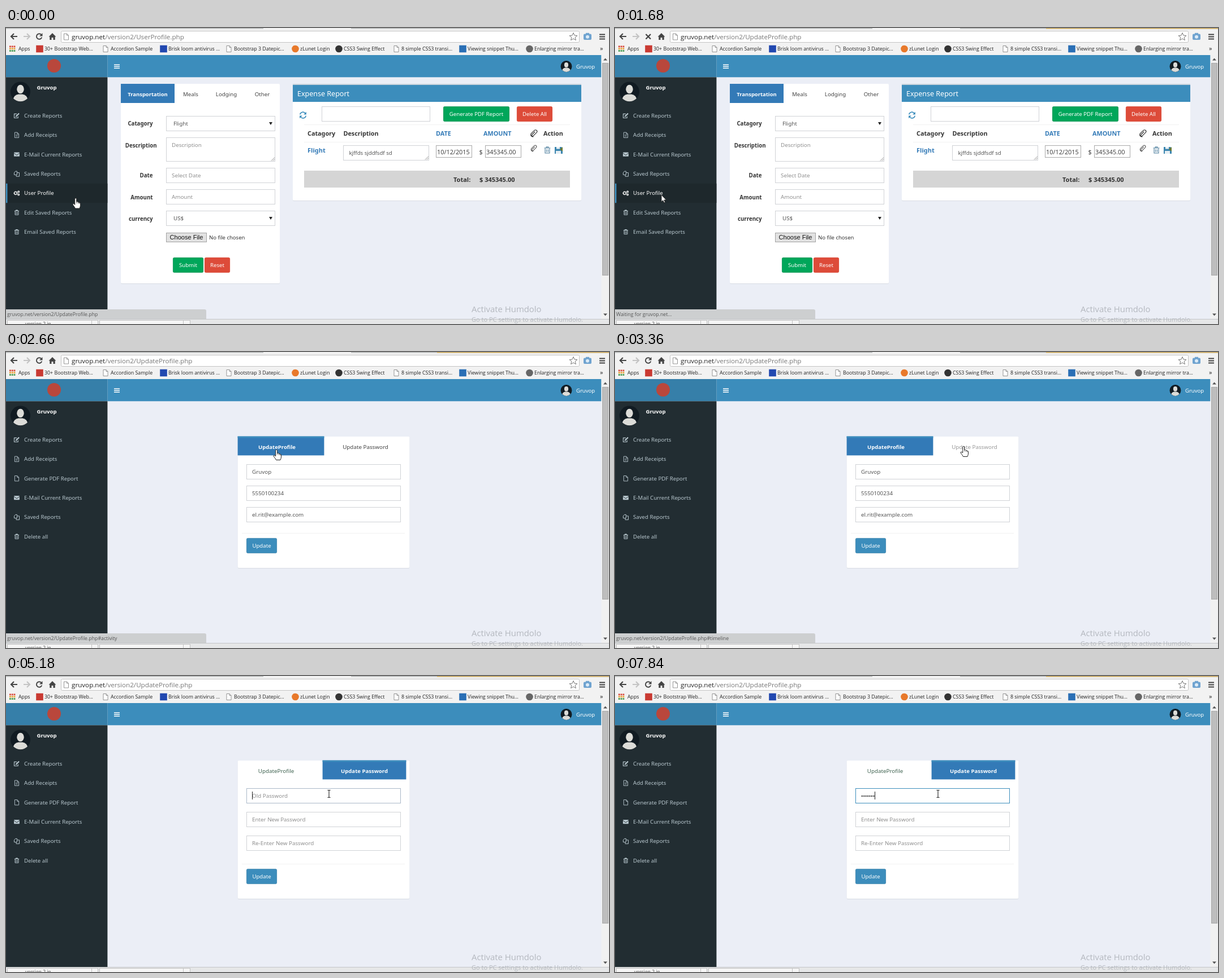
Animation of 1066x525 px, one loop 8 s. Source, as an HTML page:

```html
<!DOCTYPE html>
<html lang="en">
<head>
<meta charset="utf-8">
<title>Expense profile</title>
<style>
html, body { margin: 0; width: 100%; height: 100%; overflow: hidden; background: #ebeef6; }
svg { display: block; width: 100vw; height: 100vh; }
text { font-family: "Noto Sans", sans-serif; white-space: pre; }
.ui { font-family: "Open Sans", sans-serif; }
.arial { font-family: "Liberation Sans", sans-serif; }
.m { font-weight: 500; }
.b { font-weight: 600; }
</style>
</head>
<body>
<svg id="stage" viewBox="0 0 1066 525" preserveAspectRatio="none"></svg>
<script>
const stage = document.getElementById('stage');
const BLUE = '#3c8dbc', TAB = '#337ab7', INK = '#333', HINT = '#8f8f8f', EDGE = '#d0d2d6';
const SIDE = 179.4, RIGHT = 1052.5, TOP = 87.3;

const text = (x, y, s, size = 9.8, fill = INK, cls = '', extra = '') =>
  `<text x="${x}" y="${y}" font-size="${size}" fill="${fill}" class="${cls}" ${extra}>${s}</text>`;
const mid = 'text-anchor="middle"', end = 'text-anchor="end"';
const rect = (x, y, w, h, fill, extra = '') =>
  `<rect x="${x}" y="${y}" width="${w}" height="${h}" fill="${fill}" ${extra}/>`;
const line = (d, stroke = INK, w = 1, extra = '') =>
  `<path d="${d}" fill="none" stroke="${stroke}" stroke-width="${w}" ${extra}/>`;
const shape = (d, fill = INK, extra = '') => `<path d="${d}" fill="${fill}" ${extra}/>`;
const dot = (x, y, r, fill, extra = '') => `<circle cx="${x}" cy="${y}" r="${r}" fill="${fill}" ${extra}/>`;
const group = (s, id = '', extra = '') => `<g id="${id}" ${extra}>${s}</g>`;
const at = (x, y, s, k = 1) => `<g transform="translate(${x} ${y}) scale(${k})">${s}</g>`;
const field = (x, y, w, h, stroke = EDGE, extra = '') =>
  rect(x + .5, y + .5, w - 1, h - 1, '#fff', `stroke="${stroke}" ${extra}`);
const input = (x, y, w, h, s, fill = '#555', dx = 10) =>
  field(x, y, w, h) + text(x + dx, y + 17, s, 9.8, fill);
const button = (x, y, w, h, s, fill, edge) =>
  rect(x + .4, y + .4, w - .8, h - .8, fill, `rx="2" stroke="${edge}" stroke-width=".8"`) +
  text(x + w / 2, y + h / 2 + 3.6, s, 9.65, '#fff', 'm', mid);
const blueButton = (x, y, w, h, s) => button(x, y, w, h, s, BLUE, '#367fa9');
const greenButton = (x, y, w, h, s) => button(x, y, w, h, s, '#00a65a', '#008d4c');
const redButton = (x, y, w, h, s) => button(x, y, w, h, s, '#dd4b39', '#d73925');
const card = (x, y, w, h) =>
  rect(x, y + 1, w, h, '#d8dce4', 'rx="2"') + rect(x, y, w, h, '#fff', 'rx="2"');
const grip = (x, y) => line(`M${x - 6} ${y}l6 -6M${x - 3} ${y}l3 -3`, '#888', .9);
const triangle = (x, y) => shape(`M${x - 3} ${y - 2.5}h6l-3 5z`, '#222');

// Small icons, drawn around their centre
const icons = {
  edit: c => line('M2.5 1v3.5h-7.5v-8h5', c, 1.2) + line('M-2 2l6.5 -6.5', c, 2.4),
  file: c => line('M-4 -5.2h5l3 3v7.4h-8zM1 -5v3h3', c, 1),
  lines: c => icons.file(c) + line('M-2 0h4M-2 2.4h4', c, .9),
  mail: c => rect(-5.5, -4, 11, 8, c, 'rx="1"') + line('M-5.5 -2.5l5.5 4l5.5 -4', '#222d32', 1),
  copy: c => line('M-5 -2l2.5 -3h3v7h-5.5zM1 -2.2h4v7.4h-6v-3', c, 1.1),
  gears: c => line('M-5 0a2.8 2.8 0 1 0 5.6 0a2.8 2.8 0 1 0 -5.6 0', c, 2, 'stroke-dasharray="1.8 .4"') +
    dot(3.6, -2.8, 1.5, 'none', `stroke="${c}" stroke-width="1.4"`) +
    dot(3.6, 2.8, 1.5, 'none', `stroke="${c}" stroke-width="1.4"`),
  trash: c => line('M-4.5 -3h9M-1.5 -3v-1.6h3v1.6', c, 1.2) + line('M-3.3 -2.5v7h6.6v-7M-1.2 -1v4M1.2 -1v4', c, 1.1),
  clip: c => line('M3 -3l-5 5a1.3 1.3 0 0 0 2 2l5.5 -5.5a2.4 2.4 0 0 0 -3.6 -3.4l-5.5 5.5a3.2 3.2 0 0 0 4 4.5', c, 1.1),
  refresh: c => line('M-5 -1a5 5 0 0 1 9 -2M5 1a5 5 0 0 1 -9 2', c, 1.5) + shape('M5.6 -5.5v4.5h-4.5zM-5.6 5.5v-4.5h4.5z', c),
  page: () => shape('M-4 -5.5h5l3 3v8h-8z', '#fff', 'stroke="#888" stroke-width=".9"') + line('M1 -5.5v3h3', '#888', .9)
};
const icon = (name, x, y, c, k = 1) => at(x, y, icons[name](c), k);

const avatar = (x, y, r) => at(x, y,
  dot(0, 0, 17.5, '#111b22') +
  '<ellipse cx="0" cy="-4.5" rx="6.3" ry="7.7" fill="#dcdcd8"/>' +
  shape('M-12.5 12Q-11 6 -3.5 4.5H3.5Q11 6 12.5 12Q7 17.3 0 17.3T-12.5 12z', '#dcdcd8'), r / 17.5);

function browser() {
  const mark = (x, c, round) => round ? dot(x, 37, 6.3, c) : rect(x - 6.3, 30.7, 12.6, 12.6, c);
  const marks = [
    [68, '30+ Bootstrap Web...', '#c93a32'], [185, 'Accordion Sample'],
    [287, 'Brisk loom antivirus ...', '#2148b0'], [403, 'Bootstrap 3 Datepic...'],
    [520, 'zLunet Login', '#e8792b', 1], [597, 'CSS3 Swing Effect', '#333', 1],
    [699, '8 simple CSS3 transi...'], [816, 'Viewing snippet Thu...', '#2a6fb5'],
    [934, 'Enlarging mirror tra...', '#666', 1]
  ];
  const appColors = ['#d9483b', '#e8a33a', '#4a9b50'];
  let s = rect(0, 0, 1066, 48.5, '#f2f2f2') + rect(0, 0, 1066, 1.5, '#b9bcbc') +
    rect(455, 0, 155, 2, '#f2f2f2') + rect(762, 0, 304, 1.5, '#d2ad5c', 'id="tabs"');
  s += line('M20 15H9M14 10l-5 5l5 5', '#444', 2.2) + line('M31 15h11M37 10l5 5l-5 5', '#c4c4c4', 2.2);
  s += group(line('M62.5 12a4.8 4.8 0 1 0 .8 4.5', '#444', 2) + shape('M64.5 9v5.5h-5.5z', '#444'), 'reload');
  s += group(line('M54.5 11l8.5 8.5M63 11l-8.5 8.5', '#444', 2.3), 'stop');
  s += shape('M75.5 15.5l6.5 -6.5l6.5 6.5h-1.8v5.5h-3.2v-4h-3v4h-3.2v-5.5z', '#444');
  s += field(97, 5, 917, 21, '#c3c3c3', 'rx="2"') + icon('page', 106.5, 15.5);
  s += `<text x="116" y="19.5" font-size="11.65" class="ui" fill="#222">gruvop.net<tspan id="path" fill="#777"></tspan></text>`;
  s += line('M1003 8.5l2 4.6l5 .4l-3.8 3.2l1.2 4.9l-4.4 -2.7l-4.4 2.7l1.2 -4.9l-3.8 -3.2l5 -.4z', '#777', 1);
  s += rect(1021, 10.5, 14, 10.5, '#6fa3d0', 'rx="2"') + rect(1025, 8.8, 6, 3, '#6fa3d0') + dot(1028, 15.7, 3, '#dcebf7');
  s += rect(1049, 10.5, 10, 2, '#444') + rect(1049, 14.5, 10, 2, '#444') + rect(1049, 18.5, 10, 2, '#444');
  for (let i = 0; i < 9; i++)
    s += rect(6 + i % 3 * 3.8, 31.5 + (i / 3 | 0) * 3.8, 2.8, 2.8, appColors[(i / 3 | 0)]);
  s += text(22, 40, 'Apps', 8.8, '#222', 'ui') + text(1050, 40, '»', 11, '#222', 'ui');
  for (const [x, label, c, round] of marks)
    s += (c ? mark(x - 8.5, c, round) : icon('page', x - 9, 37)) + text(x, 40, label, 8.85, '#222', 'ui');
  return s;
}

function frame() {
  return rect(0, 48, RIGHT, 468, '#ebeef6') + rect(SIDE, 48, RIGHT - SIDE, TOP - 48, BLUE) +
    rect(0, 48, SIDE, TOP - 48, '#367fa9') + rect(0, TOP, SIDE, 516 - TOP, '#222d32') +
    dot(85, 67, 12, '#b9473c') +
    [64.5, 67.5, 70.5].map(y => rect(191, y, 10, 1.5, '#fff')).join('') +
    avatar(990.5, 68, 10) + text(1008, 72, 'Gruvop', 9.5, '#fff', 'm') +
    avatar(25.5, 113, 17.5) + text(54.5, 108.5, 'Gruvop', 9.6, '#fff', 'b') +
    rect(RIGHT, 48, 1066 - RIGHT, 468, '#f1f1f1') + rect(1054.5, 62.5, 10, 376, '#bdbdbd', 'stroke="#a8a8a8"') +
    shape('M1056 57.5h7l-3.5 -4z', '#555') + shape('M1056 506.5h7l-3.5 4z', '#555');
}

const menu = (items, active = -1) => items.map(([name, label], i) => {
  const y = 155.5 + i * 34.35, on = i === active, c = on ? '#fff' : '#b8c7ce';
  return (on ? rect(0, y - 17, SIDE, 34.3, '#1e282c') + rect(0, y - 17, 2.5, 34.3, BLUE) : '') +
    icon(name, 19, y, c, .9) + text(32, y + 3.5, label, 9.65, c, 'm');
}).join('');

function reportPage() {
  let s = menu([['edit', 'Create Reports'], ['lines', 'Add Receipts'], ['mail', 'E-Mail Current Reports'],
    ['copy', 'Saved Reports'], ['gears', 'User Profile'], ['trash', 'Edit Saved Reports'], ['trash', 'Email Saved Reports']], 4);
  s += card(203, 99, 281, 354) + rect(203, 99, 95, 34, TAB) +
    text(250.5, 121, 'Transportation', 9.45, '#fff', 'b', mid);
  for (const [x, t] of [[326.5, 'Meals'], [389.5, 'Lodging'], [453, 'Other']]) s += text(x, 121, t, 9.7, '#444', '', mid);
  for (const [x, y, t] of [[259.5, 173, 'Catagory'], [266.5, 211.5, 'Description'], [259.5, 265, 'Date'],
    [259.5, 303.5, 'Amount'], [259.5, 342, 'currency']]) s += text(x, y, t, 9.7, INK, 'b', end);
  s += input(283, 156, 193, 27, 'Flight', '#555', 13) + triangle(468, 169.5) +
    input(283, 194, 193, 43, 'Description', HINT) + grip(475, 235.5) +
    input(283, 248, 193, 27, 'Select Date', HINT) + input(283, 286, 193, 27, 'Amount', HINT) +
    input(283, 324, 193, 27, 'US$', '#555', 13) + triangle(468, 337.5);
  s += rect(283.5, 363.5, 71, 16, '#e2e2e2', 'stroke="#a3a3a3"') +
    text(319, 375.3, 'Choose File', 11.05, '#111', 'arial', mid) + text(359, 375, 'No file chosen', 9.5);
  s += greenButton(295, 407, 54, 27, 'Submit') + redButton(351, 407, 45, 27, 'Reset');

  s += card(507, 99, 510, 207) + rect(507, 99, 510, 2, '#c9d3dc') + rect(507, 101, 510, 30, BLUE) +
    text(515, 121, 'Expense Report', 12.5, '#fff') + icon('refresh', 525, 154.5, BLUE, 1.05) +
    field(558, 139, 192, 27) + greenButton(773, 139, 117, 27, 'Generate PDF Report') +
    redButton(903, 139, 63, 27, 'Delete All') +
    rect(527, 171, 470, 1, '#f1f1f1') + rect(527, 202, 470, 1, '#f1f1f1');
  for (const [x, t, c] of [[533, 'Catagory', INK], [596.5, 'Description', INK], [760, 'DATE', TAB],
    [844, 'AMOUNT', TAB], [950, 'Action', INK]]) s += text(x, 191, t, 10.8, c, 'b');
  s += icon('clip', 932, 187, '#333', 1.1) + icon('clip', 932, 213.5, '#555', .95) +
    text(533, 221, 'Flight', 11, TAB, 'b') + field(596, 208, 152, 27) +
    text(606.5, 225, 'kjffds sjddfsdf sd', 9.6, '#555') + grip(747, 233.5) +
    field(760, 208, 64, 22, '#a9a9a9') + text(762, 223.5, '10/12/2015', 10.85, '#444') +
    text(836.5, 223.5, '$', 10.8, '#444') +
    field(847, 208, 64, 22, '#a9a9a9') + text(849, 223.5, '345345.00', 10.85, '#444') +
    icon('trash', 957, 216.5, '#6a93ad', 1.2) +
    shape('M970 211h12l2 2v10h-14z', '#3c86b0') + rect(972, 218, 9, 5, '#e5eef3') +
    rect(973, 211, 6, 3.5, '#e5eef3') + shape('M979 215l5 -4v8z', '#6b7a35');
  return s + rect(527, 253, 470, 30, '#d5d5d5') + text(791, 272.5, 'Total:', 11, INK, 'b') +
    text(837, 272.5, '$ 345345.00', 11, INK, 'b');
}

function profilePage() {
  const tab = (x, w, label, cx) => rect(x - .4, 149.6, w + .8, 33.8, TAB) + rect(x - .4, 149.6, w + .8, 2.6, BLUE) +
    text(cx, 171.5, label, 9.55, '#fff', 'b', mid);
  const rows = (y0, step, labels, fill) => labels.map((t, i) => input(425, y0 + i * step, 273, 27, t, fill)).join('');
  const foot = y => rect(417, y, 288, 1, '#f1f1f1') + blueButton(425, y + 9, 54, 27, 'Update');
  return menu([['edit', 'Create Reports'], ['lines', 'Add Receipts'], ['file', 'Generate PDF Report'],
    ['mail', 'E-Mail Current Reports'], ['copy', 'Saved Reports'], ['trash', 'Delete all']]) +
    group(card(409.7, 150, 303.6, 233) + tab(410, 152, 'UpdateProfile', 479) +
      text(635.5, 171.5, 'Update Password', 9.8, '#444', '', mid + ' id="passTab"') +
      rows(199, 38, ['Gruvop', '5550100234', 'el.rit@example.com'], '#555') + foot(321), 'details') +
    group(card(409.7, 150, 303.6, 245) + tab(560, 147, 'Update Password', 633.5) +
      text(477.5, 171.5, 'UpdateProfile', 9.8, '#3f6350', '', mid) +
      rows(199, 42, ['', 'Enter New Password', 'Re-Enter New Password'], HINT) +
      field(425, 199, 273, 27, EDGE, 'id="focus"') +
      text(435, 216, 'Old Password', 9.8, HINT, '', 'id="hint"') +
      group('', 'dots') + rect(435, 205, 1, 14, '#222', 'id="caret"') + foot(333), 'password');
}

function overlay() {
  return text(823, 504, 'Activate Humdolo', 14.9, '#b4b8bf', 'ui') +
    group(shape('M0 499H351q3 0 3 3V516H0z', '#cdcfd0') +
      text(2, 511, '', 8.75, '#555', 'ui', 'id="statusText"'), 'status') +
    rect(0, 516, 1066, 9, '#e6e7e8') + rect(0, 516, 1066, 1, '#c4c6c8') +
    rect(2.5, 518.5, 160, 10, '#f6f6f6', 'stroke="#c0c0c0"') + rect(165.5, 518.5, 160, 10, '#f6f6f6', 'stroke="#c0c0c0"') +
    line('M151.5 519v6M313.5 519v6', '#c0c0c0') + text(34, 528, 'version 2.in', 8.5, '#444', 'ui') +
    text(823, 520.5, 'Go to PC settings to activate Humdolo.', 11, '#b4b8bf', 'ui');
}

const pointers =
  group(shape('M-1.3 7V1.2Q-1.3 -.2 .2 -.2T1.7 1.2V6Q4 5.4 4.5 7Q6.5 6.6 6.8 8Q8.5 7.8 8.5 9.5V12.5Q8.5 15 7 18H-.5Q-2 15 -4.8 11.5Q-5.3 9.8 -3.8 9.6Q-2.5 9.7 -1.3 11.5z',
    '#fff', 'stroke="#222" stroke-width="1"') + line('M1.7 6v3M4.5 7v2.5M6.8 8v2', '#222', .7), 'hand') +
  group(shape('M0 0V12.3L2.8 9.8L4.8 14L6.7 13.2L4.8 9H8.5z', '#fff', 'stroke="#222" stroke-width=".9"'), 'arrow') +
  group(line('M-2.5 -6.5h1.7l.8 .8l.8 -.8h1.7M0 -5.7V5.7M-2.5 6.5h1.7l.8 -.8l.8 .8h1.7', '#222', 1.1), 'beam');

stage.innerHTML = browser() + frame() + group(reportPage(), 'report') + group(profilePage(), 'profile') +
  overlay() + group(pointers, 'cursor');

const $ = id => document.getElementById(id);
const show = (id, on) => $(id).setAttribute('display', on ? 'inline' : 'none');
const put = (id, s) => { if ($(id).textContent !== s) $(id).textContent = s; };

const TICK = 140, LOOP = 8000;
// start, end, target x, target y
const moves = [[140, 560, 82, 296], [2240, 2660, 478, 173.5], [2940, 3360, 616, 167.5], [4480, 4900, 571, 209]];
const keys = [6020, 6160, 6580, 6860, 7280, 7420, 7840];

function pointer(t) {
  let x = 123, y = 302;
  for (const [a, b, tx, ty] of moves) {
    const p = Math.min(1, Math.max(0, (t - a + TICK) / (b - a + TICK)));
    const e = p * p * (3 - 2 * p);
    x += (tx - x) * e;
    y += (ty - y) * e;
  }
  return [x, y];
}

function pointerKind(t, y) {
  if (t < 1120) return 'hand';
  if (t < 2100) return 'arrow';
  if (t < 2240) return 'hand';
  if (t < 2660) return 'arrow';
  return y < 183 ? 'hand' : y < 199 ? 'arrow' : 'beam';
}

function statusLine(t) {
  const url = 'gruvop.net/version2/UpdateProfile.php';
  if (t < 1540) return url;
  if (t < 2380) return 'Waiting for gruvop.net...';
  if (t < 2660) return '';
  if (t < 3220) return url + '#activity';
  return t < 4620 ? url + '#timeline' : '';
}

function draw(time) {
  const t = Math.floor(time / TICK) * TICK;
  const [x, y] = pointer(t), kind = pointerKind(t, y), loading = t >= 1540 && t < 2100;
  $('cursor').setAttribute('transform', `translate(${x.toFixed(1)} ${y.toFixed(1)})`);
  for (const k of ['hand', 'arrow', 'beam']) show(k, k === kind);

  show('tabs', t >= 980);
  show('stop', loading);
  show('reload', !loading);
  put('path', `/version2/${t < 1540 ? 'User' : 'Update'}Profile.php`);
  const status = statusLine(t);
  show('status', status);
  put('statusText', status);

  show('report', t < 2100);
  show('profile', t >= 2100);
  show('details', t < 3920);
  show('password', t >= 3920);
  $('passTab').setAttribute('fill', x > 562 ? '#999' : '#444');

  const typed = keys.filter(k => t >= k).length, step = 3.43;
  $('focus').setAttribute('stroke', t < 5180 ? EDGE : t < 5320 ? '#aab9c9' : BLUE);
  show('hint', !typed);
  show('caret', typed || (t >= 5180 && t < 5600));
  $('caret').setAttribute('x', 435 + typed * step);
  $('dots').innerHTML = Array.from({ length: typed }, (_, i) => dot(436.8 + i * step, 213, 1.25, '#444')).join('');
}

const began = performance.now();
function tick() {
  draw((performance.now() - began) % LOOP);
  requestAnimationFrame(tick);
}
tick();
</script>
</body>
</html>
```
